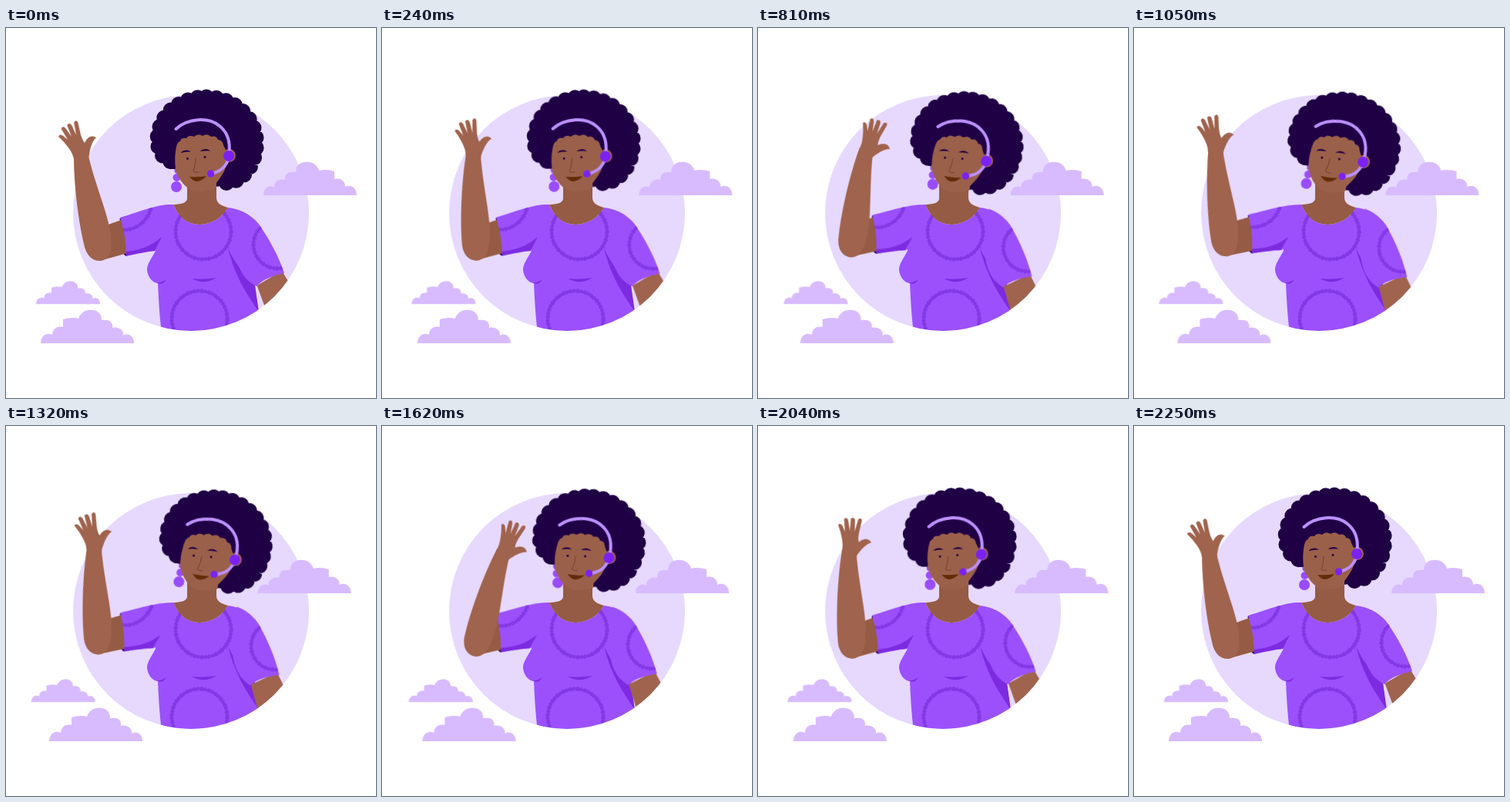
Animation, 480 px wide and 480 px high, one loop 2.28 s. Source, as an HTML page:

```html
<!DOCTYPE html>
<html lang="en">
<head>
<meta charset="utf-8">
<title>Waving support agent</title>
<style>
  html, body { margin: 0; width: 100%; height: 100%; overflow: hidden; background: #fff; }
  svg { display: block; width: 100%; height: 100%; }

  /* Slow parts swing once per loop, quick parts twice. */
  .slow, .quick, .drift {
    animation: turn 1140ms cubic-bezier(.47, 0, .53, 1) infinite alternate;
  }
  .quick { animation-duration: 570ms; }
  .drift { animation-name: drift; }
  @keyframes turn {
    from { transform: rotate(var(--a, 0deg)); }
    to { transform: rotate(var(--b)); }
  }
  @keyframes drift { to { transform: translateX(var(--b)); } }

  .head { transform-origin: 247px 217px; --b: 10deg; }
  .earring { transform-origin: 222px 186px; --b: -17deg; }
  .arm { transform-origin: 205px 250px; --b: 4deg; }
  .forearm { transform-origin: 121px 295px; --b: 25.5deg; }
  .hand { transform-origin: 97px 168px; --a: -1.5deg; --b: 26deg; animation-delay: -1030ms; }
  .sleeve { transform-origin: 305px 250px; --b: 5.5deg; }

  .cloud { fill: #d8bbfe; }
  .skin { fill: #a0634d; }
  .face { fill: #9b604a; }
  .neck { fill: #955b44; }
  .shirt { fill: #9b50fc; }
  .fold { fill: #7c2be0; }
  .hair { fill: #1f0045; stroke: #1f0045; stroke-width: 20; stroke-dasharray: 0 13; stroke-linecap: round; }
  .line { fill: none; stroke-linecap: round; stroke-linejoin: round; }
  .print { fill: none; stroke: #8339e4; stroke-width: 3.6; }
  .rough { stroke-width: 5.4; stroke-dasharray: 3 2 1.5 3; }
</style>
</head>
<body>
<svg viewBox="0 0 480 480">
  <defs>
    <path id="cloud" d="M0,43C0,34 7,29 14,33C13,26 20,21 28,23C27,15 32,12 42,13C42,2 51,-1 59,0C67,1 71,7 72,11C78,9 86,10 92,12V22C100,20 106,25 106,32C114,28 121,34 121,43Z"/>
    <path id="torso" d="M217,229C204,230 197,232 190,236L194,289C188,300 183,306 183,314C184,325 192,331 197,331C198,352 199,372 202,396H331L327,367L323,334L318,246C309,239 299,234 288,233Q275,254 251,255Q228,255 217,229Z"/>
    <path id="cuffL" d="M217,229C199,228 179,236 148,246C153,262 156,278 156,295.5C172,293 184,290 194,289L216,275Z"/>
    <path id="cuffR" d="M298,235C313,239 326,249 333,262C345,280 355,300 361,318C348,321 334,325 325,335C309,327 300,312 297,288Z"/>
    <clipPath id="disc"><circle cx="240" cy="240" r="153"/></clipPath>
    <clipPath id="inTorso"><use href="#torso"/></clipPath>
    <clipPath id="inL"><use href="#cuffL"/></clipPath>
    <clipPath id="inR"><use href="#cuffR"/></clipPath>
  </defs>

  <circle cx="240" cy="240" r="153" fill="#e6d9fd"/>

  <g class="cloud">
    <g class="drift" style="--b:-7.6px"><use href="#cloud" x="334" y="174"/></g>
    <g class="drift" style="--b:11.5px"><use href="#cloud" transform="translate(166 366) scale(-1 1)"/></g>
    <g class="drift" style="--b:-6.6px"><use href="#cloud" transform="translate(122 328.6) scale(-.686 .686)"/></g>
  </g>

  <!-- torso and far arm -->
  <g clip-path="url(#disc)">
    <use href="#torso" class="shirt"/>
    <g clip-path="url(#inTorso)" class="print">
      <circle cx="256" cy="264" r="36"/>
      <circle cx="256" cy="264" r="36" class="rough"/>
      <circle cx="251" cy="377" r="36"/>
      <circle cx="251" cy="377" r="36" class="rough"/>
    </g>
    <g class="fold">
      <path d="M241,325Q257,334 273,324Q257,327 241,325Z"/>
      <path d="M195,330Q203,335 208,326Q202,331 195,330Z"/>
      <path d="M288,286C298,308 314,325 323,334L328,368C316,350 298,326 288,286Z"/>
    </g>
    <g class="slow sleeve">
      <path class="skin" d="M325.5,334L358,315L380,352L343,381Z"/>
      <use href="#cuffR" class="shirt"/>
      <g clip-path="url(#inR)" class="print">
        <circle cx="352" cy="281" r="31"/>
        <circle cx="352" cy="281" r="31" class="rough"/>
      </g>
    </g>
  </g>

  <!-- hair -->
  <g class="slow head">
    <path class="hair" d="M260,89.5C292,89.5 324,112 325,148C325,180 305,201 285,201L262,190L224,176C208,174 197,164 196.500,146C196.500,112 226,89.500 260,89.500Z"/>
  </g>

  <path class="neck" d="M235,195V222C234,227 226,229 217,229Q228,255 251,255Q275,254 288,233C277,230 273,226 273,220V195Z"/>

  <!-- face and headset -->
  <g class="slow head">
    <g class="quick earring" fill="#9a4bfb">
      <circle cx="222" cy="185" r="3.5"/>
      <circle cx="221.500" cy="194" r="5"/>
      <circle cx="221" cy="206" r="7"/>
    </g>
    <circle class="skin" cx="289.500" cy="165.500" r="8.400"/>
    <path class="face" d="M220,160C221,153 222,148 226,147Q227,142 234,143Q237,138 244,141Q249,136 255,140Q261,136 266,141Q273,139 275,145Q281,145 282,152L286,160V177C284,187 277,195 273,201V207Q259,213 246,212C235,210 226,199 221,188Q218,174 220,160Z"/>
    <g fill="#1f0045">
      <path d="M226,162Q233,156 240,160.500Q233,160 226,162Z"/>
      <path d="M251.500,160Q258,154.500 265.500,159.500Q258,159 251.500,160Z"/>
      <circle cx="235.500" cy="169.500" r="1.400"/>
      <circle cx="258" cy="167.500" r="1.400"/>
    </g>
    <path class="line" stroke="#74402f" stroke-width="1" d="M246,169Q246,178 243,186Q246,188.500 250,187"/>
    <path fill="#622c08" d="M238,193Q249,194 260,192Q254,199 247,199Q242,198 238,193Z"/>
    <g class="line" stroke="#bc90fd" stroke-width="4">
      <path d="M220.500,131C236,117 262,115 277,127C287,135 291,148 289.500,162"/>
      <path d="M289,168C286,180 277,187 266,189"/>
    </g>
    <g fill="#7b22f2">
      <circle cx="289" cy="166" r="7"/>
      <circle cx="265.500" cy="189" r="4.700"/>
    </g>
  </g>

  <!-- waving arm -->
  <g class="slow arm">
    <path fill="#230653" d="M147.500,247L153,245L160,290L156,296L153,294Z"/>
    <path class="skin" d="M130,256L150,249C155,262 157,278 157,292L122,302Z"/>
    <path fill="#965b44" d="M128,257L150,249C155,262 157,278 157,292L131,299Z"/>
    <use href="#cuffL" class="shirt"/>
    <path class="fold" d="M156,296L156,290C178,288 192,280 202,271L193,289C180,290 168,293 156,296Z"/>
    <g clip-path="url(#inL)" class="print">
      <circle cx="152" cy="225" r="37"/>
      <circle cx="152" cy="225" r="37" class="rough"/>
    </g>
    <g class="quick forearm skin">
      <path d="M88,168C88,200 93,245 101,280C104,296 113,303 123,302C134,300 138,290 136,272C136,250 116,205 107,166Z"/>
      <circle cx="97.500" cy="168" r="9.600"/>
      <path class="quick hand" d="M88,170C86,160 79,153 75,148L68,141Q69,137 74,140L80,145L71.500,131Q73,126 77,130L85,141L79,126Q82,122 85,126L91,139L88,123Q90,118 93,122L97,139C99,145 101,148 102,149C106,140 112,139 117,142C111,147 109,157 107,170Z"/>
    </g>
  </g>
</svg>
</body>
</html>
```
